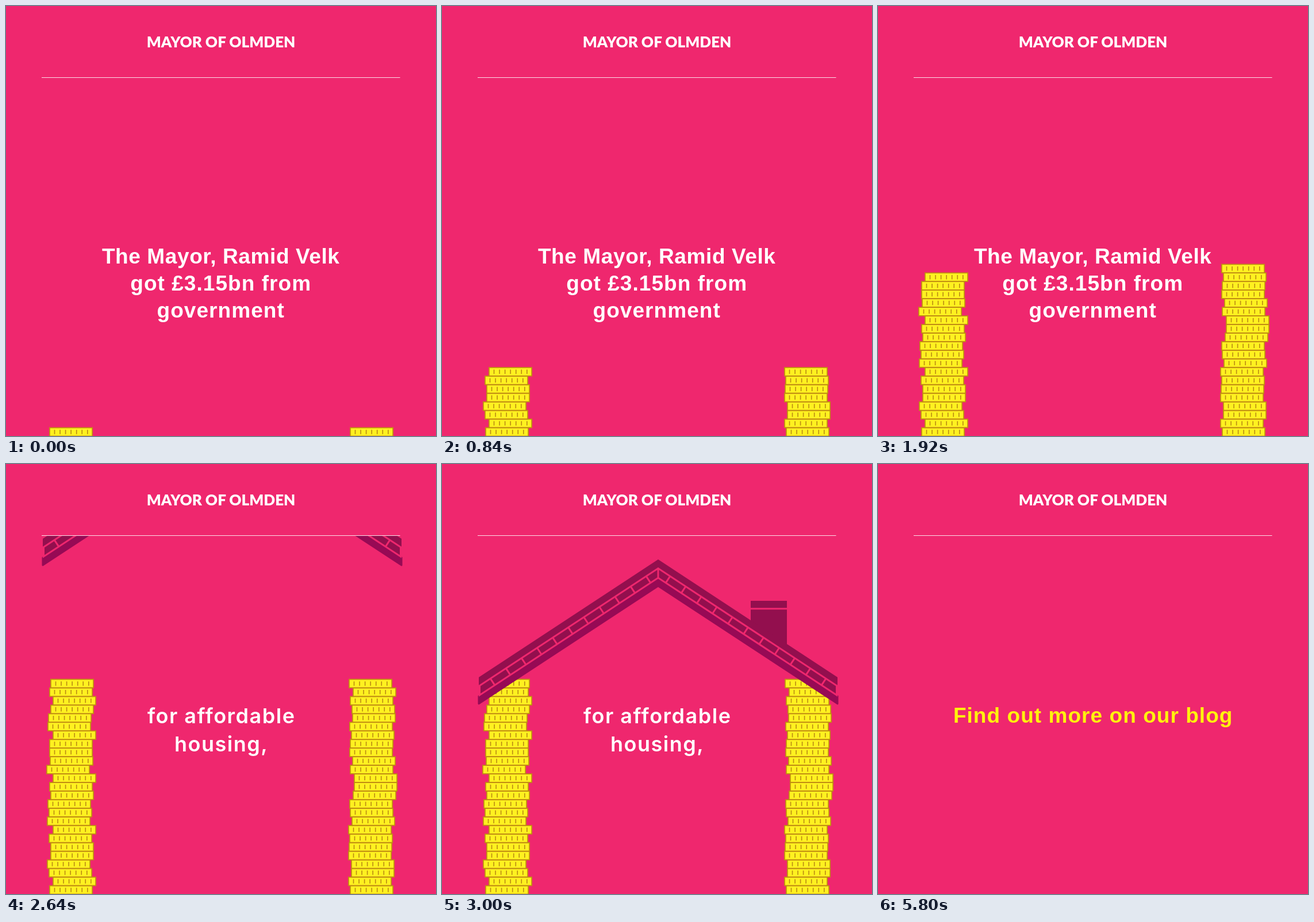
These frames come from a looping animation (748x748 px, 7.6 s). An HTML page:

```html
<!DOCTYPE html>
<html lang="en">
<head>
<meta charset="utf-8">
<title>Affordable housing</title>
<style>
  @property --count { syntax: "<integer>"; inherits: true; initial-value: 1; }

  html, body { margin: 0; width: 100%; height: 100%; overflow: hidden; background: #ef276e; }
  svg { display: block; width: 100%; height: 100%; }

  text { text-anchor: middle; fill: #fff; }
  .brand { font: 900 26.1px Lato, sans-serif; }
  .grotesk { font: 700 37px "Liberation Sans", Arial, sans-serif; letter-spacing: 1.05px; }
  .grotesk .tight { letter-spacing: .6px; }
  .inter { font: 600 36px Inter, sans-serif; letter-spacing: 1.5px; }
  .yellow { fill: #fff20d; }

  .scene { animation: 7600ms step-end infinite; }
  .intro { animation-name: intro; }
  .purpose { animation-name: purpose; }
  .record { animation-name: record; }
  .outro { animation-name: outro; }
  .walls { animation-name: walls; }
  .roof-window { animation-name: roof-window; }

  @keyframes intro { 0% { visibility: visible } 34.7368%, 100% { visibility: hidden } }
  @keyframes purpose {
    0% { visibility: hidden } 34.7368% { visibility: visible } 52.6315%, 100% { visibility: hidden }
  }
  @keyframes record {
    0% { visibility: hidden } 52.6315% { visibility: visible } 76.3157%, 100% { visibility: hidden }
  }
  @keyframes outro { 0% { visibility: hidden } 76.3157%, 100% { visibility: visible } }
  @keyframes walls { 0% { visibility: visible } 76.3157%, 100% { visibility: hidden } }
  @keyframes roof-window {
    0% { visibility: hidden } 34.7368% { visibility: visible } 76.3157%, 100% { visibility: hidden }
  }

  /* Each stack counts its coins; a coin shows once the count passes its index. */
  .stack { animation: 7600ms steps(7, end) infinite; }
  .left { animation-name: stack-left; }
  .right { animation-name: stack-right; }
  .coin { opacity: calc(var(--count) - var(--i)); }
  @keyframes stack-left {
    0% { --count: 1 } 11.0526% { --count: 8 } 22.1052% { --count: 16 } 33.1578%, 100% { --count: 25 }
  }
  @keyframes stack-right {
    0% { --count: 1 } 11.0526% { --count: 8 } 22.1052% { --count: 18 } 33.1578%, 100% { --count: 25 }
  }

  .roof { animation: drop 7600ms steps(9, end) infinite; }
  @keyframes drop {
    0%, 34.7368% { transform: translateY(-241px) }
    39.4736%, 100% { transform: translateY(0) }
  }

  .pink-line { fill: none; stroke: #ef276e; stroke-width: 3; }
</style>
</head>
<body>
<svg viewBox="0 0 748 748">
  <defs>
    <clipPath id="below-rule"><rect y="125" width="748" height="623"/></clipPath>
    <g id="coin">
      <rect x=".9" y=".9" width="74.2" height="14.7" fill="#fff120" stroke="#c18d12" stroke-width="1.8"/>
      <path id="ticks" stroke="#b98a14" stroke-width="1.6"/>
    </g>
  </defs>

  <rect width="748" height="748" fill="#ef276e"/>

  <g class="scene walls">
    <g class="stack left"></g>
    <g class="stack right"></g>
  </g>

  <g class="scene roof-window" clip-path="url(#below-rule)">
    <g class="roof">
      <path d="M537 238h63v77h-63z" fill="#930f4e"/>
      <path class="pink-line" d="M537 251.8h63"/>
      <path d="M64 371L376 166L688 371V405L376 200L64 405z" fill="#930f4e"/>
      <path d="M64 404L376 199L688 404V417L376 212.3L64 417z"
            fill="#970a55" stroke="#970a55" stroke-width="3" stroke-linejoin="round"/>
      <path class="pink-line" d="M65.5 385.5L376 181.5L686.5 385.5V402L376 198L65.5 402zM376 181.5V198"/>
      <path id="seams" class="pink-line"/>
    </g>
  </g>

  <g class="scene record">
    <rect x="328.5" y="560.5" width="91" height="190" rx="1.5" fill="#9a0859"/>
    <path d="M341 606a33 33 0 0 1 66 0z" fill="#a8e2fa"/>
    <path d="M374 572V606L349 581M374 606L399 581" fill="none" stroke="#9a0859" stroke-width="3.5"/>
    <path class="pink-line" d="M341 618.5h27v41h-27zM380 618.5h27v41h-27zM341 695h27v41h-27zM380 695h27v41h-27z"/>
    <rect x="358.5" y="671.5" width="31.5" height="11.5" fill="#d2d3d4"/>
    <circle cx="403.5" cy="677" r="3.2" fill="#ef276e"/>
  </g>

  <text class="brand" x="374" y="72">MAYOR OF OLMDEN</text>
  <path d="M62 124.5H685.5" stroke="#fff" stroke-opacity=".85"/>

  <g class="scene intro grotesk">
    <text class="tight" x="373.7" y="447.5">The Mayor, Ramid Velk</text>
    <text x="373.7" y="494.5">got £3.15bn from</text>
    <text x="373.7" y="541.5">government</text>
  </g>
  <g class="scene purpose inter">
    <text x="374.7" y="450.5">for affordable</text>
    <text x="374.7" y="500">housing,</text>
  </g>
  <g class="scene record inter">
    <text x="374.5" y="451">that’s a record.</text>
  </g>
  <g class="scene outro grotesk">
    <text class="yellow" x="374.2" y="449.5">Find out more on our blog</text>
  </g>
</svg>
<script>
  const find = selector => document.querySelector(selector);
  const repeat = (n, make) => Array.from({ length: n }, (_, i) => make(i)).join("");

  // Left edges of the coins, from the ground up.
  const stacks = {
    left: [75, 81, 74, 71, 77, 77, 74, 81, 71, 74, 72, 77, 75, 81, 70, 76, 75, 75, 81, 72, 73, 77, 81, 75, 77],
    right: [598, 595, 600, 600, 595, 596, 597, 595, 601, 598, 597, 603, 605, 605, 598, 602, 597, 598, 600,
      597, 602, 601, 598, 603, 596]
  };
  for (const [side, edges] of Object.entries(stacks)) {
    find(".stack." + side).innerHTML = repeat(edges.length, i =>
      `<use href="#coin" class="coin" style="--i:${i}" x="${edges[i]}" y="${732.7 - i * 14.96}"/>`);
  }
  find("#ticks").setAttribute("d", repeat(7, i => `M${9.5 + i * 9.55} 4.5v7.5`));

  // Brick joints run square to the slope, mirrored about the ridge.
  find("#seams").setAttribute("d", repeat(11, i => {
    const run = 288 - i * 27.1, y = 189.8 + run * .657;
    return [-1, 1].map(side =>
      `M${376 + side * (run + 3.7)} ${y - 5.6}L${376 + side * (run - 3.7)} ${y + 5.6}`).join("");
  }));
</script>
</body>
</html>
```
